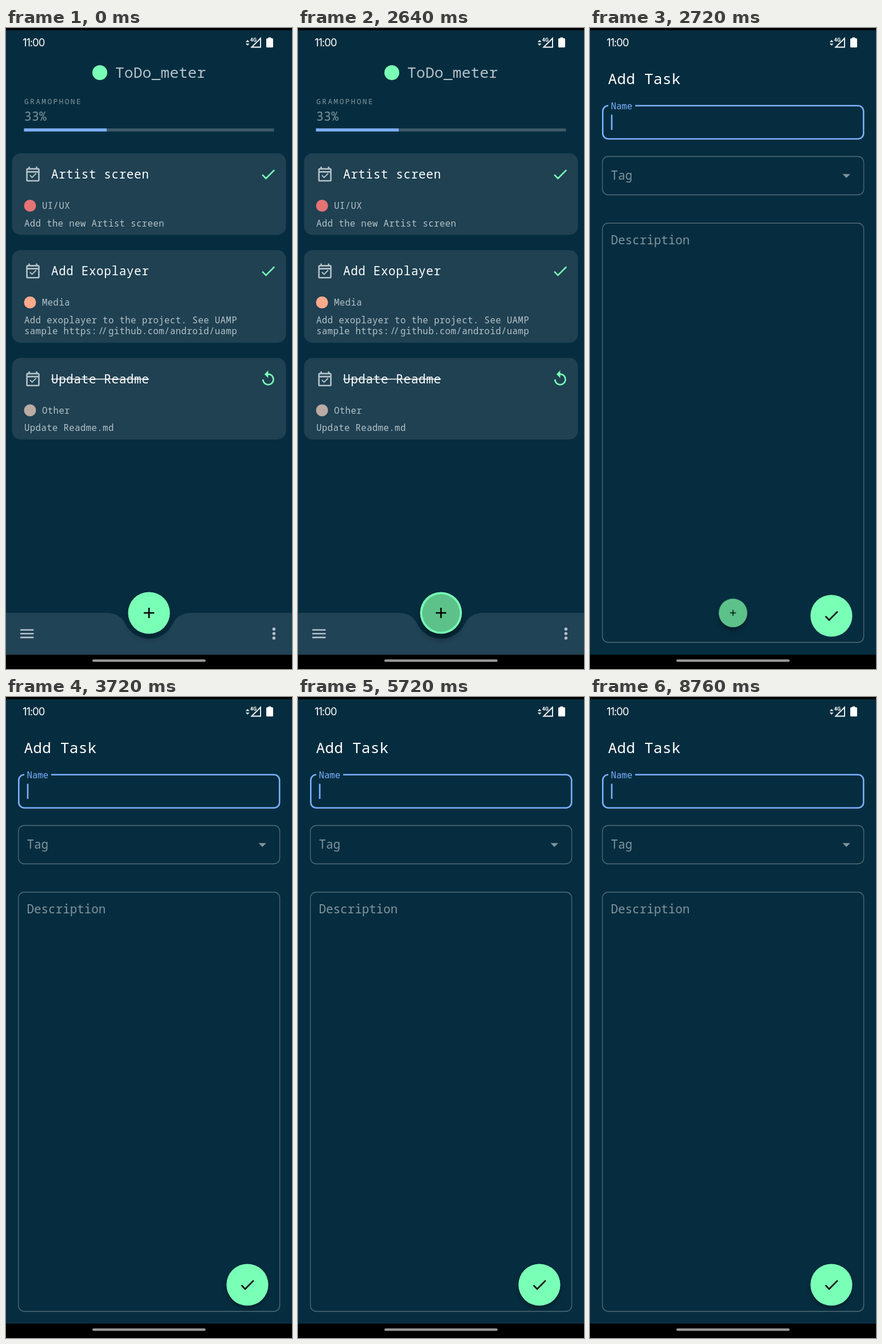
An HTML page for the animation above (9.24 s loop, 500x1120 px).

```html
<!DOCTYPE html>
<html lang="en">
<head>
<meta charset="utf-8">
<title>Task list</title>
<style>
  html, body { margin: 0; width: 100%; height: 100%; overflow: hidden; background: #000; }
  svg { display: block; width: 100vw; height: 100vh; }
  text { font-family: "Noto Sans Mono", "DejaVu Sans Mono", monospace; white-space: pre; }

  .h6 { font-size: 26.1px; letter-spacing: .2px; }
  .title { font-size: 20.9px; letter-spacing: .65px; fill: #fff; }
  .body { font-size: 15.65px; letter-spacing: .41px; fill: #b5c2c9; }
  .hint { font-size: 20.9px; fill: #80959f; }
  .over { font-size: 13px; letter-spacing: 2.3px; fill: #80959f; }
  .clock { font: 18.5px Inter, sans-serif; letter-spacing: -1.1px; fill: #fff; }
  .net { font: 700 9px Roboto, sans-serif; fill: #fff; }

  .card { fill: #1f4152; }
  .soft { fill: #b5c2c9; }
  .mint { fill: #7affb6; }
  .box { fill: none; stroke: #506c7a; stroke-width: 1.3; }

  .list, .form, .bar, .caret, .fab, .plus, .ripple, .lift, .shade {
    animation: 9240ms step-end infinite;
  }
  .list { animation-name: list; }
  .form { animation-name: form; }
  .bar { animation-name: bar; }
  .caret { animation-name: caret; }
  .fab, .plus, .ripple { transform-origin: 250px 1022px; }
  .fab { animation-name: fab; }
  .plus { animation-name: plus; }
  .ripple { animation-name: ripple; }
  .lift { animation-name: lift; filter: blur(6px); }
  .shade { animation-name: shade; filter: blur(4px); }

  @keyframes list { 0% { visibility: visible } 29.43%, 100% { visibility: hidden } }
  @keyframes form { 0% { visibility: hidden } 29.43%, 100% { visibility: visible } }
  @keyframes bar { 0% { visibility: visible } 29%, 100% { visibility: hidden } }
  @keyframes caret {
    0%, 40.25%, 51.08%, 61.9%, 72.72%, 83.54%, 94.8%, 100% { opacity: 1 }
    35.06%, 45.45%, 56.7%, 67.53%, 78.35%, 89.17% { opacity: 0 }
  }
  @keyframes fab {
    0% { transform: scale(1) }
    29.43% { transform: scale(.68) }
    29.87% { transform: scale(.36) }
    30.3% { transform: scale(.08) }
    30.73%, 100% { transform: scale(0) }
  }
  @keyframes plus {
    0% { transform: scale(1) }
    29.43% { transform: scale(.84) }
    29.87%, 100% { transform: scale(.6) }
  }
  @keyframes ripple {
    0% { transform: scale(0); opacity: 0 }
    27.7% { transform: scale(.5); opacity: .12 }
    28.13% { transform: scale(.72); opacity: .24 }
    28.57% { transform: scale(.9); opacity: .24 }
    29%, 100% { transform: scale(1); opacity: .24 }
  }
  @keyframes lift {
    0% { opacity: .2 }
    27.7% { opacity: .25 }
    28.13% { opacity: .3 }
    28.57%, 100% { opacity: .36 }
  }
  @keyframes shade {
    0% { opacity: 0 }
    29.87% { opacity: .12 }
    30.3% { opacity: .22 }
    30.73%, 100% { opacity: .32 }
  }
</style>
</head>
<body>
<svg viewBox="0 0 500 1120" preserveAspectRatio="none">
  <defs>
    <path id="event" class="soft" transform="scale(1.304) translate(-12 -12)"
      d="M19 4h-1V2h-2v2H8V2H6v2H5c-1.11 0-1.99.9-1.99 2L3 20a2 2 0 0 0 2 2h14c1.1 0 2-.9 2-2V6c0-1.1-.9-2-2-2zm0 16H5V10h14v10zm0-12H5V6h14v2zM15.88 10.5l1.06 1.06-6 6-3.5-3.5 1.06-1.06 2.44 2.44z"/>
    <path id="check" transform="scale(1.304) translate(-12 -12)"
      d="M9 16.17L4.83 12l-1.42 1.41L9 19 21 7l-1.41-1.41z"/>
    <path id="undo" transform="scale(1.304) translate(-12 -12)"
      d="M12 5V1L7 6l5 5V7c3.31 0 6 2.69 6 6s-2.69 6-6 6-6-2.69-6-6H4c0 4.42 3.58 8 8 8s8-3.58 8-8-3.58-8-8-8z"/>
  </defs>

  <rect y="4" width="500" height="1091" fill="#062d3f"/>

  <!-- status bar -->
  <text class="clock" x="29" y="32.3">11:00</text>
  <path d="M419 24.6l3.3-3.6 3.3 3.6zM419 27.2l3.3 3.6 3.3-3.6z" fill="#fff"/>
  <path d="M429.5 33.5L445 18V33.5z" fill="none" stroke="#fff" stroke-width="1.8"/>
  <path d="M426 15.5h13.5v7l-3 2.5h-10.500z" fill="#062d3f"/>
  <text class="net" x="426.800" y="23.800">4G</text>
  <path d="M458.500 16.500h5v1.500h2a1.500 1.500 0 0 1 1.500 1.500v13a1.500 1.500 0 0 1-1.500 1.500h-9a1.500 1.500 0 0 1-1.500-1.500v-13a1.500 1.500 0 0 1 1.500-1.500h2z" fill="#fff"/>

  <g class="list">
    <circle class="mint" cx="164" cy="78" r="13"/>
    <text class="h6 soft" x="191" y="86.500">ToDo_meter</text>
    <text class="over" x="32" y="132.500">GRAMOPHONE</text>
    <text class="hint" x="32" y="162" letter-spacing=".65">33%</text>
    <path d="M31.500 178.200H468.500" stroke="#3f5b69" stroke-width="5.200"/>
    <path d="M31.500 178.200H176" stroke="#7db0ff" stroke-width="5.200"/>

    <rect class="card" x="10.500" y="219" width="479" height="142.500" rx="15"/>
    <use href="#event" x="47" y="255.300"/>
    <text class="title" x="79" y="263">Artist screen</text>
    <use class="mint" href="#check" x="458.400" y="255.500"/>
    <circle cx="42" cy="310.500" r="10.500" fill="#e57373"/>
    <text class="body" x="63" y="316">UI/UX</text>
    <text class="body" x="32" y="346.500">Add the new Artist screen</text>

    <rect class="card" x="10.500" y="388" width="479" height="162" rx="15"/>
    <use href="#event" x="47" y="424.500"/>
    <text class="title" x="79" y="432">Add Exoplayer</text>
    <use class="mint" href="#check" x="458.400" y="424.700"/>
    <circle cx="42" cy="479.500" r="10.500" fill="#ffab8c"/>
    <text class="body" x="63" y="485">Media</text>
    <text class="body" x="32" y="515.700">Add exoplayer to the project. See UAMP</text>
    <text class="body" x="32" y="535">sample https:<tspan dx="2">/</tspan><tspan dx="-4">/</tspan><tspan dx="2">github.com/android/uamp</tspan></text>

    <rect class="card" x="10.500" y="576.500" width="479" height="142.500" rx="15"/>
    <use href="#event" x="47" y="613"/>
    <text class="title" x="79" y="620.500">Update Readme</text>
    <path d="M79 613.500H250" stroke="#fff" stroke-width="1.400"/>
    <use class="mint" href="#undo" x="458.400" y="612.700"/>
    <circle cx="42" cy="668" r="10.500" fill="#bcaaa4"/>
    <text class="body" x="63" y="673.500">Other</text>
    <text class="body" x="32" y="704">Update Readme.md</text>
  </g>

  <g class="bar">
    <path fill="#214356" d="M0 1022H174C194 1022 203 1030 208.500 1041A46 46 0 0 0 291.500 1041C297 1030 306 1022 326 1022H500V1095H0Z"/>
    <path d="M25 1051.700H48.300M25 1058.300H48.300M25 1064.900H48.300" stroke="#b5c2c9" stroke-width="2.600"/>
    <g class="soft">
      <circle cx="468.400" cy="1050.200" r="2.700"/>
      <circle cx="468.400" cy="1058.100" r="2.700"/>
      <circle cx="468.400" cy="1066" r="2.700"/>
    </g>
  </g>

  <g class="form">
    <text class="h6" x="31.500" y="98" fill="#fff">Add Task</text>
    <rect x="22.300" y="135.800" width="455.900" height="57.900" rx="9.500" fill="none" stroke="#7db0ff" stroke-width="2.600"/>
    <rect x="32" y="132" width="47" height="8" fill="#062d3f"/>
    <text x="36.500" y="142.300" font-size="15.650" fill="#7db0ff">Name</text>
    <rect class="caret" x="36.700" y="151.500" width="2.600" height="26.500" fill="#7db0ff"/>

    <rect class="box" x="21.700" y="224.500" width="456.900" height="67" rx="10"/>
    <text class="hint" x="36.500" y="265">Tag</text>
    <path d="M441.500 255.300h13.400l-6.700 6.700z" fill="#80959f"/>

    <rect class="box" x="21.700" y="341" width="456.900" height="732.500" rx="10"/>
    <text class="hint" x="36.500" y="378">Description</text>

    <circle class="shade" cx="422" cy="1031.500" r="36"/>
    <circle class="mint" cx="422" cy="1027" r="36.600"/>
    <use href="#check" x="422" y="1027"/>
  </g>

  <g class="fab">
    <circle class="lift" cx="250" cy="1031" r="36"/>
    <circle class="mint" cx="250" cy="1022" r="36.600"/>
    <circle class="ripple" cx="250" cy="1022" r="36.600"/>
    <path class="plus" d="M240.900 1022H259.100M250 1012.900V1031.100" stroke="#000" stroke-width="2.600"/>
  </g>

  <!-- system navigation -->
  <rect y="1095" width="500" height="25"/>
  <rect x="151" y="1103.300" width="198" height="4.200" rx="2.100" fill="#999"/>
</svg>
</body>
</html>
```
